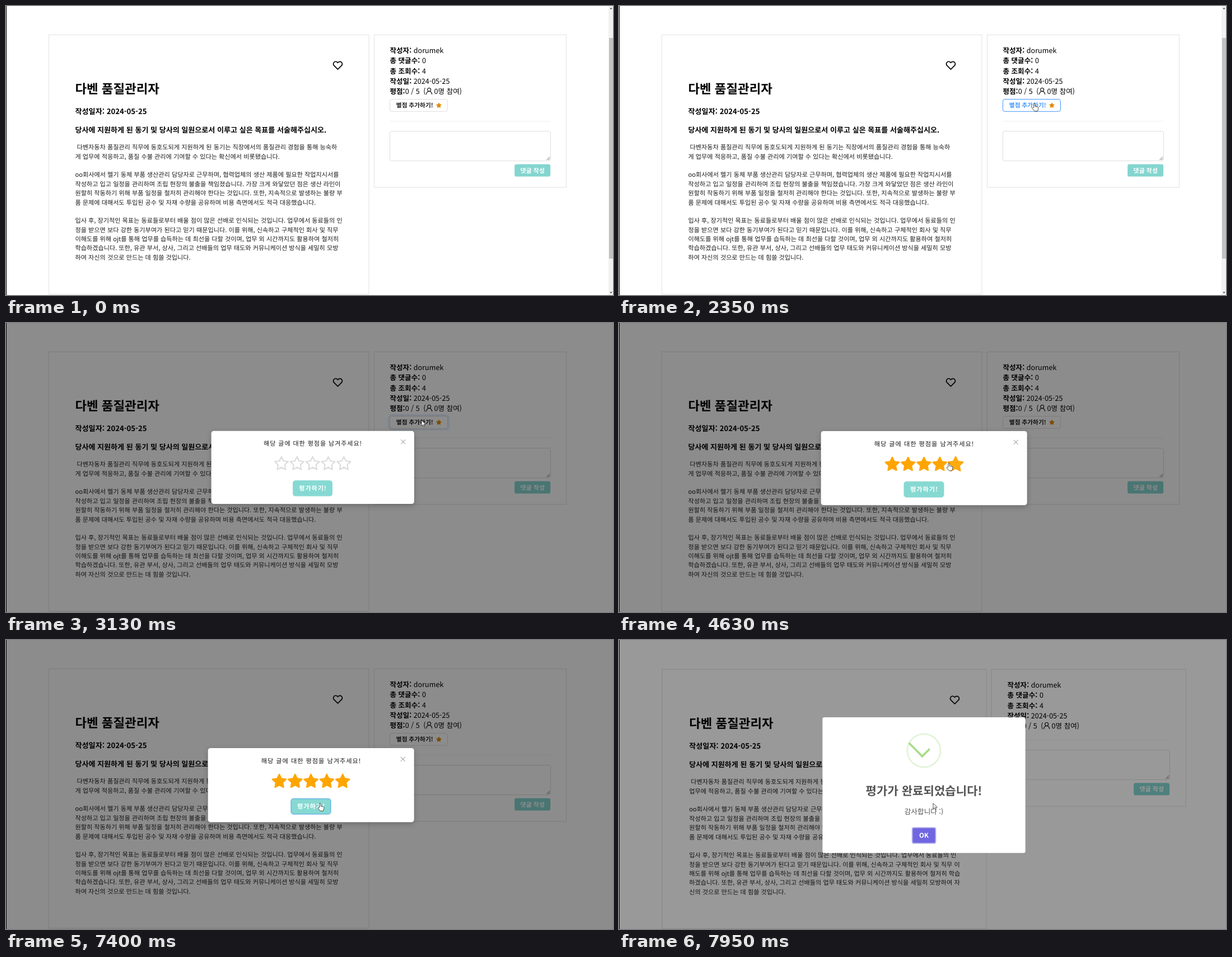
Recreate the animation shown at these times as an HTML page. Size 1084 by 516 pixels, loop 8000 ms.

```html
<!DOCTYPE html>
<html lang="ko">
<head>
<meta charset="utf-8">
<style>
html, body { margin: 0; width: 100%; height: 100%; overflow: hidden; background: #fff; }
svg { display: block; width: 100%; height: 100%; }
text { white-space: pre; font-family: "Noto Sans CJK KR", "Noto Sans CJK JP", "Noto Sans CJK", sans-serif; text-rendering: geometricPrecision; }
</style>
</head>
<body>
<svg id="stage" viewBox="0 0 1084 516"></svg>
<script>
const LOOP = 8000;
const stage = document.getElementById('stage');

// "|" breaks a line in the narrow layout, "/" in the wide one.
const ESSAY = `\u00a0다벤자동차 품질관리 직무에 동호도되게 지원하게 된 동기는 직장에서의 품질관리 경험을 통해 능숙하|게/ 업무에 적응하고, 품질 수불 관리에 기여할 수 있다는 확신에서 비롯됐습니다.

oo회사에서 헬기 동체 부품 생산관리 담당자로 근무하며, 협력업체의 생산 제품에 필요한 작업지시서를
작성하고 입고 일정을 관리하며 조립 현장의 불출을 책임졌습니다. 가장 크게 와닿았던 점은 생산 라인이
원할히 작동하기 위해 부품 일정을 철저히 관리해야 한다는 것입니다. 또한, 지속적으로 발생하는 불량 부
품 문제에 대해서도 투입된 공수 및 자재 수량을 공유하며 비용 측면에서도 적극 대응했습니다.

입사 후, 장기적인 목표는 동료들로부터 배울 점이 많은 선배로 인식되는 것입니다. 업무에서 동료들의 인
정을 받으면 보다 강한 동기부여가 된다고 믿기 때문입니다. 이를 위해, 신속하고 구체적인 회사 및 직무| 이/해도를 위해 ojt를 통해 업무를 습득하는 데 최선을 다할 것이며, 업무 외 시간까지도 활용하여 철저히| 학습/하겠습니다. 또한, 유관 부서, 상사, 그리고 선배들의 업무 태도와 커뮤니케이션 방식을 세밀히 모방|하여 자/신의 것으로 만드는 데 힘쓸 것입니다.`;

const essayLines = wide => ESSAY
  .replace(wide ? /\|/g : /\//g, '')
  .replace(wide ? /\/ ?/g : /\| ?/g, '\n')
  .split('\n');

// Timing helpers
const ramp = (t, a, b) => Math.min(1, Math.max(0, (t - a) / (b - a)));
const smooth = p => p * p * (3 - 2 * p);
const easeOut = p => 1 - (1 - p) ** 3;
const easeInOut = p => p < .5 ? 2 * p * p : 1 - 2 * (1 - p) ** 2;
const linear = p => p;
function track(keys, t, ease = smooth) {
  let i = 0;
  while (i < keys.length - 2 && t > keys[i + 1][0]) i++;
  const [a, b] = [keys[i], keys[i + 1]];
  const p = ease(ramp(t, a[0], b[0]));
  return a.slice(1).map((v, k) => v + (b[k + 1] - v) * p);
}
const mix = (from, to, p) => `color-mix(in srgb, ${to} ${p * 100}%, ${from})`;

// Drawing helpers
const text = (x, y, size, str, attrs = '') =>
  `<text x="${x}" y="${y}" font-size="${size}" ${attrs}>${str}</text>`;
const rect = (x, y, w, h, attrs, r = 0) =>
  `<rect x="${x}" y="${y}" width="${w}" height="${h}" rx="${r}" ${attrs}/>`;
const path = (d, attrs) => `<path d="${d}" ${attrs}/>`;
const group = (transform, content, attrs = '') =>
  `<g transform="${transform}" ${attrs}>${content}</g>`;
const zoom = (x, y, s) => `translate(${x} ${y}) scale(${s}) translate(${-x} ${-y})`;
const shade = a => rect(0, 0, 1084, 516, `fill="#000" opacity="${a}"`);
const BOLD = 'font-weight="700"';
const MIDDLE = 'text-anchor="middle"';

function star(x, y, r, attrs) {
  const points = Array.from({ length: 10 }, (_, i) => {
    const a = i * Math.PI / 5, d = i % 2 ? r * .5 : r;
    return `${x + d * Math.sin(a)},${y - d * Math.cos(a)}`;
  });
  return `<polygon points="${points.join(' ')}" stroke-linejoin="round" ${attrs}/>`;
}

const CARD = 'fill="#fff" stroke="#e2e2e2"';

function article(wide) {
  const x = wide ? 124.7 : 123.4;
  return rect(76.5, 51.5, wide ? 579 : 571.5, 463, CARD)
    + group(`translate(${wide ? 589.9 : 583.4} 97) scale(.76)`,
      path('M20.84 4.61a5.5 5.5 0 0 0-7.78 0L12 5.67l-1.06-1.06a5.5 5.5 0 0 0-7.78 7.78L12 21.23l8.84-8.84a5.5 5.5 0 0 0 0-7.78z',
        'fill="none" stroke="#000" stroke-width="2.3"'))
    + text(x, 156.4, 22.4, '다벤 품질관리자', BOLD)
    + text(x, 193.3, 13.15, '작성일자: 2024-05-25', BOLD)
    + text(x, 225.8, 13.05, '당사에 지원하게 된 동기 및 당사의 일원으로서 이루고 싶은 목표를 서술해주십시오.', BOLD)
    + essayLines(wide).map((line, i) => text(x, 256.3 + i * 16.38, 11.15, line, 'fill="#1c1c1c"')).join('');
}

function rateButton(t) {
  const hover = ramp(t, 1740, 2140) * (1 - ramp(t, 2910, 3010));
  const blue = t < 2610 ? '#4096ff' : '#0958d9';
  const wave = ramp(t, 2980, 3320);
  const ring = wave > 0 && wave < 1
    ? rect(684, 165, 106.5, 25, `fill="none" stroke="#1677ff" stroke-width="3.4" opacity="${.22 * (1 - wave)}"`, 5) : '';
  return ring
    + rect(685.5, 166.5, 103, 21.8, `fill="#fff" stroke="${mix('#dedede', '#4096ff', hover)}"`, 3.4)
    + text(696.8, 181.2, 10.7, '별점 추가하기!', `${BOLD} fill="${mix('#1c1c1c', blue, hover)}"`)
    + star(773, 177.6, 4.6, 'fill="#e08a00" stroke="#e08a00" stroke-width=".9"');
}

function sidebar(t, wide, rated, textHover) {
  const rows = [['작성자:', ' dorumek'], ['총 댓글수:', ' 0'], ['총 조회수:', ' 4'], ['작성일:', ' 2024-05-25'], ['평점:', '0 / 5']];
  const right = wide ? 975.5 : 972.5;
  const form = path(`M685.5 205.7H${right}`, 'stroke="#f0f0f0"')
    + rect(685.5, 223.5, right - 685.5, 53, `fill="#fff" stroke="${mix('#dedede', '#4096ff', textHover)}"`, 3.4)
    + path(`M${right - 7} 275l5.5-5.5M${right - 4} 275l2.5-2.5`, 'stroke="#555" stroke-width=".9"')
    + rect(right - 64.3, 282.6, 64, 22, 'fill="#84d5cf"', 3.4)
    + text(right - 32.2, 297.6, 11, '댓글 작성', `${BOLD} ${MIDDLE} fill="#fff"`);
  const content = rows.map(([label, value], i) =>
      text(685.4, 84.2 + i * 18.2, 12.6, `<tspan ${BOLD}>${label}</tspan>${value}`)).join('')
    + text(745.2, 157, 12.6, '(') + text(764.6, 157, 12.6, '0명 참여)')
    + path('M755.7 146.4a3 3 0 1 1-.01 0zM750.6 158c.4-3.4 2.4-5.6 5.1-5.6s4.7 2.2 5.1 5.6', 'fill="none" stroke="#111" stroke-width="1.2"')
    + (rated ? '' : rateButton(t))
    + group(`translate(0 ${rated ? -28.3 : 0})`, form);
  return rect(wide ? 664.5 : 657.5, 51.5, wide ? 347.5 : 343, rated ? 244.5 : 272.3, CARD)
    + group(`translate(${wide ? 7.5 : 0} 0)`, content);
}

const scrollbar = () => rect(1076, 0, 8, 516, 'fill="#f1f1f1"')
  + rect(1077, 57, 7, 394, 'fill="#c1c1c1"')
  + path('M1078.3 5.5h4.4l-2.2-2.8zM1078.3 510.5h4.4l-2.2 2.8z', 'fill="#505050"');

function ratingDialog(t) {
  const fade = ramp(t, 2910, 3110);
  if (!fade || t > 7620) return '';
  const close = easeInOut(ramp(t, 7420, 7620));
  const scale = t < 7420 ? easeOut(ramp(t, 2887, 3212)) : 1 - close;
  const opacity = ramp(t, 2910, 3025) * (1 - close) ** 2;

  const stars = [0, 1, 2, 3, 4].map(i => {
    const on = i < 4 ? ramp(t, 4190, 4340) : ramp(t, 4480, 4640);
    const grow = i === 3 ? ramp(t, 4190, 4350) - ramp(t, 4460, 4660)
      : i === 4 ? ramp(t, 4480, 4680) - ramp(t, 5950, 6150) : 0;
    const x = 488 + i * 28.3;
    return group(zoom(x, 252, 1 + .1 * grow), star(x, 252.6, 12.8,
      `fill="${mix('#fff', '#ffa500', on)}" stroke="${mix('#dcdcdc', '#ffa500', on)}" stroke-width="2.2"`));
  }).join('');

  const hover = ramp(t, 6060, 6230);
  const wave = ramp(t, 6570, 6920);
  const ring = wave > 0 && wave < 1
    ? rect(507.5, 281.5, 74, 31, `fill="none" stroke="#1677ff" stroke-width="3.2" opacity="${.25 * (1 - wave)}"`, 5.5) : '';

  const content = rect(360.7, 193, 368, 132.3, 'fill="#fff" style="filter:drop-shadow(0 3px 5px rgb(0 0 0 / .22))"', 4.5)
    + text(545, 219.7, 11.29, '해당 글에 대한 평점을 남겨주세요!', `${MIDDLE} font-weight="500" letter-spacing=".9" fill="#1c1c1c"`)
    + path('M704.8 208.7l8 8m0-8l-8 8', 'stroke="#808080"')
    + stars + ring
    + rect(509, 283.2, 71, 27.8, `fill="#86d9d2" stroke="${mix('#86d9d2', '#4a9fe8', hover)}"`, 4.2)
    + text(545, 301.4, 11.29, '평가하기!', `${MIDDLE} ${BOLD} letter-spacing=".9" fill="#fff"`);
  return shade(.45 * fade * (1 - ramp(t, 7420, 7620)))
    + group(zoom(742, 173.5, scale), content, `opacity="${opacity}"`);
}

function checkMark(t) {
  const p = ramp(t, 7414, 8164), em = 11.29;
  const bar = (left, top, w, angle) => w < .01 ? '' : rect(left, top, w, .3125,
    `fill="#a5dc86" transform="rotate(${angle} ${left + w / 2} ${top + .156})"`, .125);
  const ease = q => 1 - (1 - q) ** 1.9;
  const [tipLeft, tipTop, tipW] = track([[.54, .125, 1.0625, 0], [.7, -.375, 2.1875, 3.125], [.84, 1.3125, 3, 1.0625]], p);
  const [longRight, longTop, longW] = track([[.65, 2.875, 3.375, 0], [.84, 0, 2.1875, 3.4375]], p, ease);
  return group(`translate(516.3 169.3) scale(${em})`,
    bar(tipLeft, tipTop, tipW, 45) + bar(5 - longRight - longW, longTop, longW, -45));
}

function doneDialog(t) {
  if (t < 7410) return '';
  const [scale] = track([[7410, .7], [7545, 1.05], [7650, .95], [7710, 1]], t, linear);
  const content = rect(363.4, 138, 362.3, 242.3, 'fill="#fff"', 3.2)
    + '<circle cx="544.5" cy="197.5" r="29.6" fill="none" stroke="#a5dc86" stroke-opacity=".32" stroke-width="2.8"/>'
    + checkMark(t)
    + text(544.5, 277, 21.1, '평가가 완료되었습니다!', `${BOLD} ${MIDDLE} fill="#545454"`)
    + text(544.5, 310.8, 12.7, '감사합니다 :)', `${MIDDLE} fill="#545454"`)
    + rect(523.7, 335, 41.8, 28, 'fill="#7066e0" stroke="#b7b2ef" stroke-width="1.8"', 3)
    + text(544.5, 353.2, 11.6, 'OK', `${BOLD} ${MIDDLE} fill="#fff"`);
  return shade(.4 * ramp(t, 7410, 7510)) + group(zoom(544.5, 259.2, scale), content);
}

const POINTER = [[1240, 850, 499], [1800, 745, 180], [2000, 745, 180], [2350, 742, 174], [3580, 742, 173.5],
  [4300, 575, 251], [4420, 575, 251], [4830, 602, 249], [5890, 602, 249], [6230, 561, 291.5]];

function pointer(t, [x, y]) {
  if (t < 1240) return '';
  const hand = t > 1740 && t < 2980 || t > 4190 && t < 7410;
  return group(`translate(${x} ${y})`, path(hand
    ? 'M-1.2 7.2V1.2a1.2 1.2 0 0 1 2.4 0V5.2l4.6 1a1.6 1.6 0 0 1 1.2 1.7l-.6 3.2-1 2.7H.3L-3.6 9.2a1.1 1.1 0 0 1 1.6-1.5z'
    : 'M0 0V10.2L2.4 8 4 11.6 5.7 10.9 4.1 7.3H7.4z',
    'fill="#fff" stroke="#222" stroke-width=".8" stroke-linejoin="round"'));
}

function render(time) {
  const t = Math.min(time, 7950);
  const wide = t >= 7680, rated = t >= 7410;
  const spot = track(POINTER, t);
  const overText = t >= 1240 && t < 1800 && spot[1] > 223 && spot[1] < 277 ? 1 : 0;
  return rect(0, 0, 1084, 516, 'fill="#fff"')
    + group(`translate(${wide ? .5 : 0} ${wide ? 1 : 0})`, article(wide) + sidebar(t, wide, rated, overText))
    + (t < 2900 ? scrollbar() : '')
    + ratingDialog(t) + doneDialog(t)
    + rect(0, 0, 1, 516, 'fill="#000"')
    + pointer(t, spot);
}

let shown = '';
function tick() {
  const picture = render(performance.now() % LOOP);
  if (picture !== shown) stage.innerHTML = shown = picture;
  requestAnimationFrame(tick);
}
tick();
</script>
</body>
</html>
```
